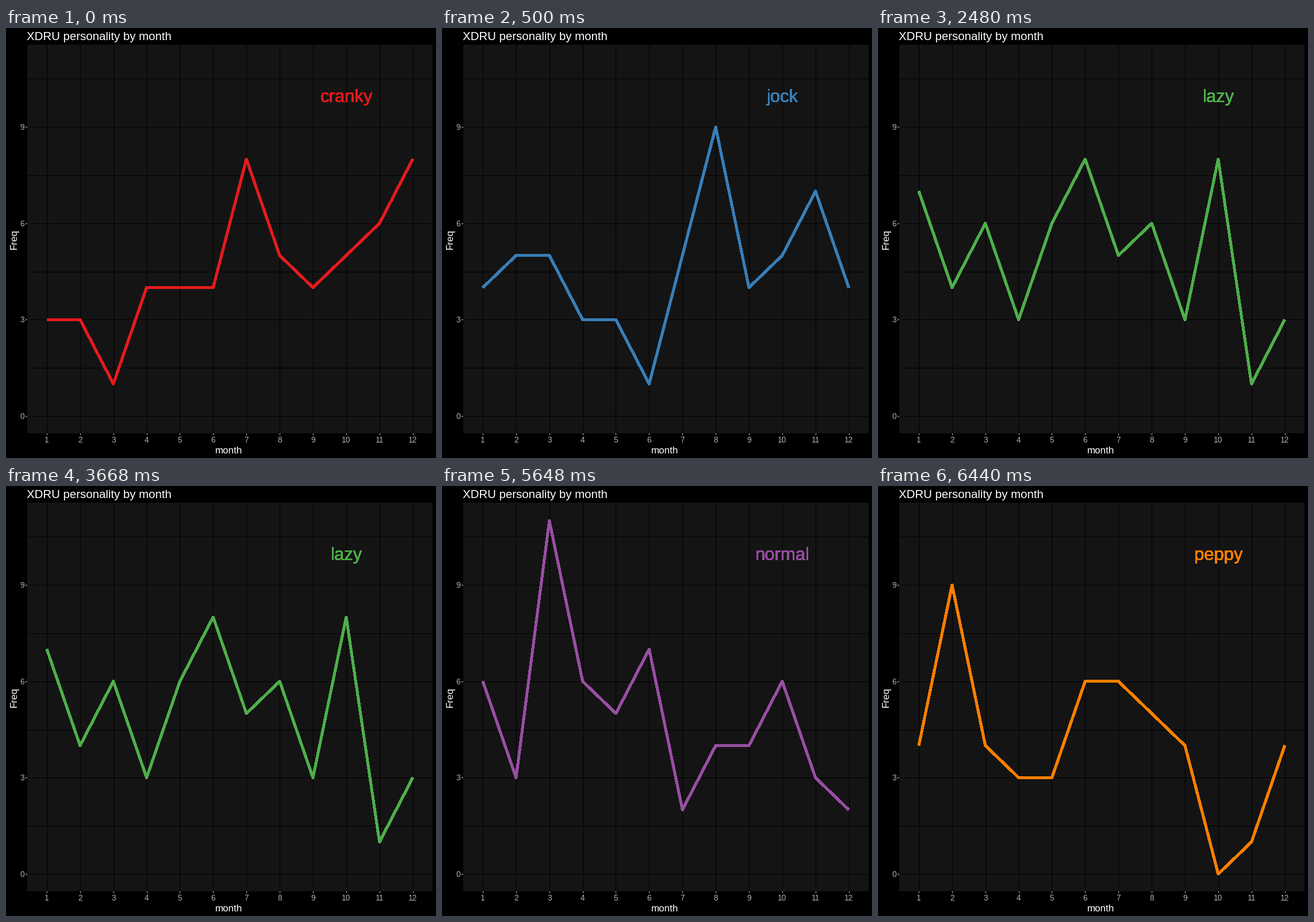
Recreate the animation shown at these times as a matplotlib script. Size 748 by 748 pixels, loop 8000 ms.

```python
import matplotlib.pyplot as plt
from matplotlib.animation import FuncAnimation
from matplotlib.patches import Rectangle

SIZE, DPI = 748, 100
INTERVAL, FRAMES = 20, 400
FIRST_HOLD, HOLD = 25, 99  # frames before the first change, then per series
PX = 72 / DPI              # points per pixel
BASE = 17                  # base font size in pixels
LEFT, TOP, RIGHT, BOTTOM = 37, 29, 742, 705
MONTHS = range(1, 13)

# Monthly counts, the only measured data in the chart.
COUNTS = {
    "cranky": [3, 3, 1, 4, 4, 4, 8, 5, 4, 5, 6, 8],
    "jock": [4, 5, 5, 3, 3, 1, 5, 9, 4, 5, 7, 4],
    "lazy": [7, 4, 6, 3, 6, 8, 5, 6, 3, 8, 1, 3],
    "normal": [6, 3, 11, 6, 5, 7, 2, 4, 4, 6, 3, 2],
    "peppy": [4, 9, 4, 3, 3, 6, 6, 5, 4, 0, 1, 4],
}
NAMES = list(COUNTS)

plt.rcParams["font.family"] = "Liberation Sans"
plt.rcParams["text.hinting"] = "default"


def x_pos(month):
    return 71 + 57.87 * (month - 1)


def y_pos(value):
    return 675 - 55.87 * value


fig = plt.figure(figsize=(SIZE / DPI, SIZE / DPI), dpi=DPI, facecolor="black")
ax = fig.add_axes([0, 0, 1, 1])
ax.set_xlim(0, SIZE)
ax.set_ylim(SIZE, 0)
ax.axis("off")


def box(x, y, width, height, color):
    ax.add_patch(Rectangle((x, y), width, height, fc=color, lw=0,
                           antialiased=False, zorder=1))


def label(x, y, text, size, color="white", ha="center", **kwargs):
    return ax.text(x, y, text, fontsize=size * PX, color=color, ha=ha,
                   va="baseline", **kwargs)


box(LEFT, TOP, RIGHT - LEFT, BOTTOM - TOP, "#141414")

for step in range(8):
    y = round(y_pos(1.5 * step))
    box(LEFT, y, RIGHT - LEFT, 1, "black")
    if step % 2 == 0:
        box(LEFT - 3, y, 3, 1, "#CCCCCC")
        label(32, y + 5, str(3 * step // 2), 0.8 * BASE, "#B3B3B3", "right")

for month in MONTHS:
    x = round(x_pos(month))
    box(x, TOP, 1, BOTTOM - TOP, "black")
    box(x, BOTTOM, 1, 3, "#CCCCCC")
    label(x, 721, str(month), 0.8 * BASE, "#B3B3B3")

label(36, 21, "XDRU personality by month", 1.2 * BASE, ha="left")
label(388, 740, "month", BASE)
label(19, 367, "Freq", BASE, rotation=90, rotation_mode="anchor")

curve, = ax.plot([], [], lw=4 * PX, antialiased=False, zorder=2,
                 solid_joinstyle="round", solid_capstyle="butt", snap=False)
# One name per data point, stacked, which hardens the letter edges.
stack = [label(592, 129, "", 31) for _ in MONTHS]


def update(frame):
    index = (frame - FIRST_HOLD) // HOLD + 1
    name, color = NAMES[index], plt.cm.Set1(index)
    curve.set_data([x_pos(m) for m in MONTHS],
                   [y_pos(v) for v in COUNTS[name]])
    curve.set_color(color)
    for text in stack:
        text.set_text(name)
        text.set_color(color)
    return [curve, *stack]


anim = FuncAnimation(fig, update, frames=FRAMES, interval=INTERVAL,
                     repeat=True, repeat_delay=0, blit=False)
plt.show()
```
